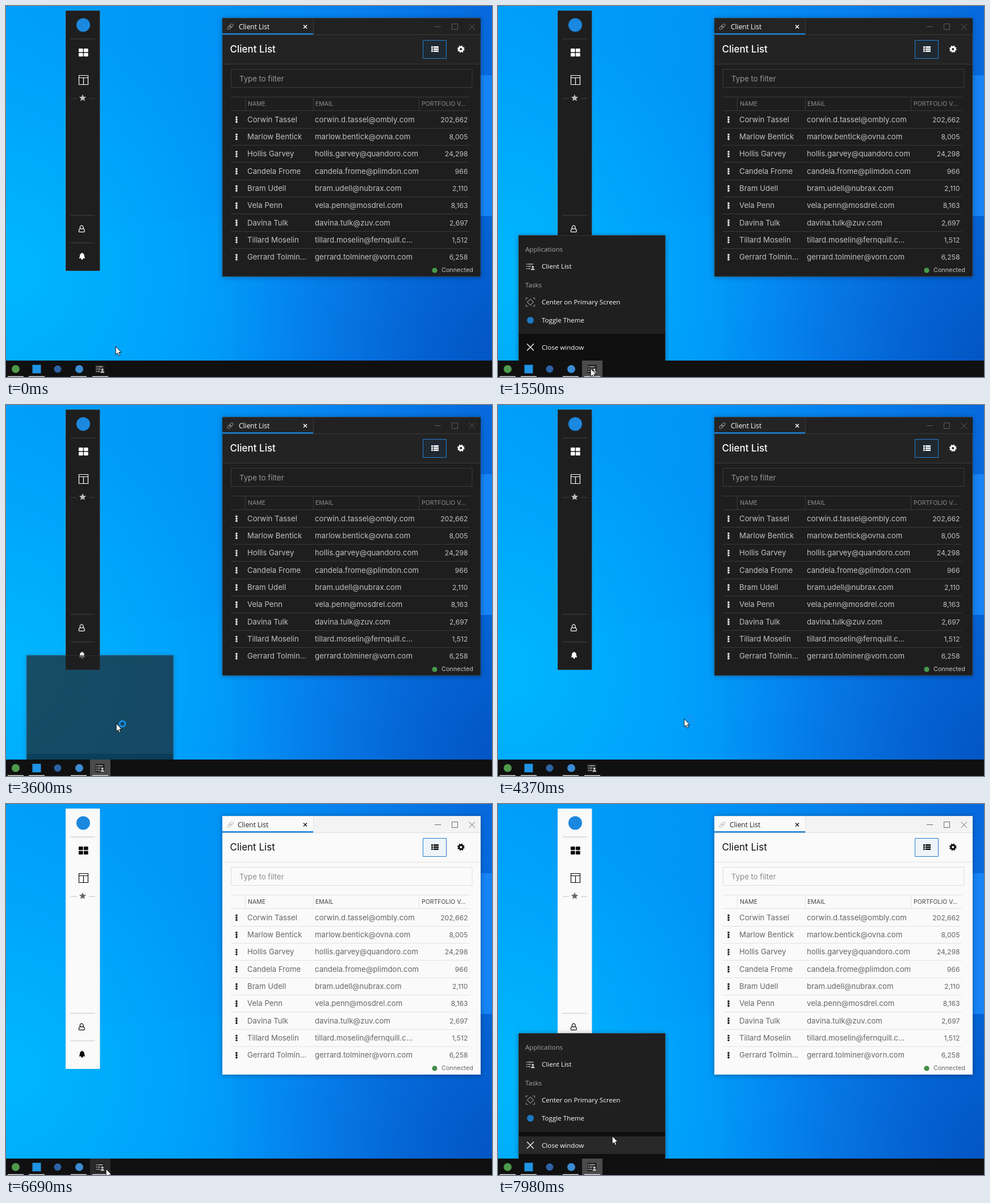
An HTML page for the animation above (8000 ms loop, 856 by 654 pixels).

```html
<!DOCTYPE html>
<html lang="en">
<head>
<meta charset="utf-8">
<title>Client List</title>
<style>
html, body { margin: 0; width: 100%; height: 100%; overflow: hidden; background: #0098f8; }
svg { display: block; }

/* the content changes first, controls fade in, the title bar follows */
#scene { animation: theme 8s step-end infinite, controls 8s step-end infinite, chrome 8s step-end infinite; }

@keyframes theme {
  0% {
    --dock: #1e1e1e; --dock-line: #383838; --star: #bdbdbd;
    --page: #1e1e1e; --head: #232323; --frame: #343434; --line: #3a3a3a; --toggle: #202931;
    --ink: #fff; --label: #8e8e8e; --hint: #999; --cell: #c2c2c2; --weight: 500;
  }
  59.75%, 100% {
    --dock: #fafafa; --dock-line: #d4d4d4; --star: #666;
    --page: #fafafa; --head: #fafafa; --frame: #f6f6f6; --line: #e2e2e2; --toggle: #eef4f9;
    --ink: #111; --label: #444; --hint: #8c8c8c; --cell: #666; --weight: 400;
  }
}
@keyframes controls {
  0% { --dock-icon: #fff; --field: #3c3c3c; --dot: #479a4b; }
  59.75% { --dock-icon: #ececec; --field: #fafafa; --dot: #4a6b4c; }
  60.625% { --dock-icon: #999; --field: #eee; --dot: #49774b; }
  61.5%, 100% { --dock-icon: #0a0a0a; --field: #dedede; --dot: #458d4a; }
}
@keyframes chrome {
  0% {
    --bar: #212121; --tab: #242424; --bar-line: #3a3a3a;
    --ctl: #5c5c5c; --link: #858585; --tab-ink: #fff; --shift: 0px;
  }
  61.5%, 100% {
    --bar: #f3f3f3; --tab: #fafafa; --bar-line: #dedede;
    --ctl: #6a6a6a; --link: #c4c4c4; --tab-ink: #222; --shift: -2px;
  }
}

/* shared text styles */
.ui { font: 11.6px "Open Sans", sans-serif; fill: #fff; }
.app { font: 13.2px Inter, sans-serif; }
.dim { fill: #a6a6a6; }

/* dock */
.shadow { filter: drop-shadow(0 1px 4px rgba(0, 0, 0, .35)); }
.dock { fill: var(--dock); stroke: var(--frame); }
.dock-line { stroke: var(--dock-line); stroke-width: 1.4; }
.dock-icon { fill: var(--dock-icon); }
.dock-outline { fill: none; stroke: var(--dock-icon); stroke-width: 1.2; }
.star { fill: var(--star); }

/* client window */
.page { fill: var(--page); }
.head { fill: var(--head); }
.bar { fill: var(--bar); }
.tab { fill: var(--tab); }
.frame { fill: none; stroke: var(--frame); }
.line { fill: none; stroke: var(--line); }
.bar-line { fill: none; stroke: var(--bar-line); }
.field { fill: none; stroke: var(--field); }
.toggle { fill: var(--toggle); stroke: #2480cf; }
.ctl { fill: none; stroke: var(--ctl); }
.link { fill: none; stroke: var(--link); stroke-width: 1.2; }
.ink { fill: var(--ink); }
.ink-line { fill: none; stroke: var(--ink); }
.tab-close { stroke: var(--tab-ink); stroke-width: 1.5; }
.tab-title { font: 500 12px "Open Sans", sans-serif; fill: var(--tab-ink); transform: translateX(var(--shift)); }
.title { font-size: 17px; font-weight: var(--weight); fill: var(--ink); }
.label { font-size: 10.5px; fill: var(--label); }
.hint { fill: var(--hint); }
.cell { fill: var(--cell); }
.num { font-size: 12.2px; text-anchor: end; }
.status { font-size: 10.8px; fill: var(--cell); }
.dot { fill: var(--dot); }

/* task bar and jump list */
.button { animation: button 8s step-end infinite; }
@keyframes button {
  0% { fill: transparent; }
  7.625% { fill: #2a2a2a; }
  15.25% { fill: #4b4b4b; }
  45.875% { fill: transparent; }
  81.875% { fill: #2a2a2a; }
  91.125%, 100% { fill: #4b4b4b; }
}
.menu { animation: menu 8s step-end infinite; }
@keyframes menu {
  0%, 45.875% { opacity: 0; transform: translateY(40px); }
  16.875%, 92% { opacity: .5; transform: translateY(37px); }
  17.75%, 92.875% { opacity: .9; transform: translateY(14px); }
  18.625%, 93.75% { opacity: 1; transform: translateY(4px); }
  19.375%, 94.625%, 100% { opacity: 1; transform: none; }
  44.125% { opacity: .9; transform: translateY(16px); }
  45% { opacity: .69; transform: translateY(37px); }
}
.items { animation: items 8s step-end infinite; }
@keyframes items {
  0%, 44.125% { opacity: 0; }
  17.75%, 92.875%, 100% { opacity: 1; }
}
.pick-theme { fill: #353535; animation: pick-theme 8s step-end infinite; }
@keyframes pick-theme {
  0%, 44%, 100% { opacity: 0; }
  31.375% { opacity: 1; }
}
.pick-close { fill: #292929; animation: pick-close 8s step-end infinite; }
@keyframes pick-close {
  0%, 29.625% { opacity: 0; }
  27%, 98%, 100% { opacity: 1; }
}

/* pointer: holds between moves, advances in small even steps */
.pointer { animation: pointer 8s step-end infinite; }
@keyframes pointer {
  0% { transform: translate(193px, 600px); }
  2.375% { transform: translate(193px, 600px); animation-timing-function: steps(8); }
  9.375% { transform: translate(165px, 634px); }
  12.75% { transform: translate(163px, 639px); }
  23.5% { transform: translate(163px, 639px); animation-timing-function: steps(5); }
  27.875% { transform: translate(176px, 600px); animation-timing-function: steps(5); }
  32.25% { transform: translate(193px, 568px); animation-timing-function: steps(2); }
  34% { transform: translate(192px, 563px); animation-timing-function: steps(4); }
  37.5% { transform: translate(194px, 561px); }
  46% { transform: translate(194px, 561px); animation-timing-function: steps(4); }
  49.375% { transform: translate(273px, 547px); animation-timing-function: steps(9); }
  57.25% { transform: translate(355px, 556px); }
  72.25% { transform: translate(355px, 556px); animation-timing-function: steps(4); }
  75.75% { transform: translate(305px, 580px); animation-timing-function: steps(4); }
  79.25% { transform: translate(215px, 622px); animation-timing-function: steps(4); }
  82.75% { transform: translate(176px, 641px); }
  83.625% { transform: translate(176px, 643px); }
  95.5% { transform: translate(176px, 643px); animation-timing-function: steps(5); }
  99.75%, 100% { transform: translate(201px, 585px); }
}
.busy { animation: busy 8s step-end infinite; }
@keyframes busy {
  0%, 57.25%, 100% { opacity: 0; }
  40.875% { opacity: 1; }
}
</style>
</head>
<body>
<svg id="scene" width="856" height="654" viewBox="0 0 856 654">
  <defs>
    <linearGradient id="sky">
      <stop offset="0" stop-color="#009ff8"/>
      <stop offset=".4" stop-color="#0096f7"/>
      <stop offset=".72" stop-color="#0780ee"/>
      <stop offset="1" stop-color="#0669dc"/>
    </linearGradient>
    <radialGradient id="glow" gradientUnits="userSpaceOnUse" cx="0" cy="470" r="460">
      <stop offset="0" stop-color="#00b8ff"/>
      <stop offset="1" stop-color="#00b0ff" stop-opacity="0"/>
    </radialGradient>
    <radialGradient id="dusk" gradientUnits="userSpaceOnUse" cx="880" cy="620" r="440">
      <stop offset="0" stop-color="#0354c2"/>
      <stop offset="1" stop-color="#0360d0" stop-opacity="0"/>
    </radialGradient>
    <g id="clients">
      <path d="M-7-5h2M-7-1h2M-7 3h2M-4-5h9M-4-1h5M-4 3h4" stroke="#b8b8b8" stroke-width="1.6"/>
      <circle cx="4.3" cy="0" r="1.9" fill="#d0d0d0"/>
      <path d="M1 5.4q0-3 3.3-3t3.3 3z" fill="#d0d0d0"/>
    </g>
  </defs>

  <g id="wallpaper">
    <path fill="url(#sky)" d="M0 0h856v654H0z"/>
    <path fill="url(#glow)" d="M0 0h856v654H0z"/>
    <path fill="url(#dusk)" d="M0 0h856v654H0z"/>
    <path fill="#00b4ff" opacity=".1" d="M0 411 400 368V654H0z"/>
    <path fill="#1684f4" d="M836 122h248v248H836z"/>
  </g>

  <g id="dock">
    <path class="dock" d="M105.5 8.5h59.5v458h-59.5z"/>
    <circle cx="136" cy="33.5" r="12" fill="#1b88e0"/>
    <path class="dock-line" d="M113.5 58h43M113.5 369h43M113.5 417.5h43M114 163h11M146 163h11"/>
    <g class="dock-icon">
      <rect x="128" y="75" width="7.7" height="6.2" rx="1"/>
      <rect x="137" y="75" width="7.7" height="6.2" rx="1"/>
      <rect x="128" y="82.700" width="7.7" height="6.2" rx="1"/>
      <rect x="137" y="82.700" width="7.7" height="6.2" rx="1"/>
    </g>
    <path class="dock-outline" d="M128.5 122.5h16v16h-16zM128 126.500h17M136.500 127v12"/>
    <path class="star" transform="translate(135 162)" d="M0-6.2 1.8-2 6.2-1.7 2.8 1.2 3.9 5.6 0 3.2-3.9 5.6-2.8 1.2-6.2-1.7-1.8-2Z"/>
    <g class="dock-outline" transform="translate(133.3 393)">
      <circle cy="-2.8" r="3"/>
      <path d="M-2.3-.6C-5 .2-5 2.500-5 4.2Q-5 5.400-3.800 5.400H3.800Q5 5.400 5 4.2C5 2.500 5 .2 2.300-.6"/>
    </g>
    <g class="dock-icon" transform="translate(134 441)">
      <path d="M-5.6 3.8Q-3.9 2-3.9-1a3.9 3.9 0 0 1 7.8 0Q3.9 2 5.6 3.8z"/>
      <circle cy="-5" r="1"/><circle cy="4.6" r="1.6"/>
    </g>
  </g>

  <g id="window">
    <path class="page shadow" d="M381 21h455v456H381z"/>
    <path class="head" d="M381 50h455v53H381z"/>
    <path class="frame" d="M381.5 21.5h454v455h-454z"/>
    <path class="bar" d="M381 21h455v30H381z"/>
    <path class="tab" d="M381 21h160.5v29H381z"/>
    <path class="line" d="M382 102.5h453"/>
    <path class="bar-line" d="M541.5 21v29M381 50.5h455M381 21.5h455"/>
    <path fill="#1a80d6" d="M381 48h160v2.6H381z"/>
    <g class="link" transform="translate(395 36.5) rotate(-45)">
      <rect x="-6.2" y="-2.1" width="7.2" height="4.2" rx="2.1"/>
      <rect x="-1" y="-2.1" width="7.2" height="4.2" rx="2.1"/>
    </g>
    <text class="tab-title" x="410" y="41">Client List</text>
    <path class="tab-close" d="M524 33.5l6 6M530 33.5l-6 6"/>
    <path class="ctl" d="M755 36.5h11M785.5 31.5h10v10h-10zM815.5 31.5l10.5 10.5M826 31.5l-10.5 10.5"/>

    <g class="app">
      <text class="title" x="394.5" y="81.5">Client List</text>
      <path class="toggle" d="M734.5 60.5h41v32h-41z"/>
      <path class="ink" d="M749 71h3v2.7h-3zM753 71h9v2.7h-9zM749 74.7h3v2.7h-3zM753 74.7h9v2.7h-9zM749 78.4h3v2.7h-3zM753 78.4h9v2.7h-9z"/>
      <g class="ink-line" transform="translate(801.3 76)">
        <circle r="3.5" stroke-width="2.8"/>
        <circle r="5.2" stroke-width="2.2" stroke-dasharray="2.3 1.784"/>
      </g>
      <path class="field" d="M396.5 111.5h424.5v32h-424.5z"/>
      <text class="hint" x="411" y="132.7">Type to filter</text>
      <path class="line" d="M396 160.5h421M396 184.5h421M421.5 161v23M541.5 161v23M727.5 161v23"/>
      <text class="label" x="426" y="176">NAME</text>
      <text class="label" x="545" y="176">EMAIL</text>
      <text class="label" x="732" y="176">PORTFOLIO V...</text>
      <g id="rows"></g>
      <circle class="dot" cx="755" cy="466" r="4.6"/>
      <text class="status" x="767" y="469.3">Connected</text>
    </g>
  </g>

  <g class="menu">
    <path class="shadow" fill="#1f1f1f" stroke="#383838" d="M36.5 404.5h258v221h-258z"/>
    <path fill="#0f0f0f" d="M37 578h257v47H37z"/>
    <g class="items ui">
      <path class="pick-theme" d="M37 538.5h257V570H37z"/>
      <path class="pick-close" d="M37 586h257v31H37z"/>
      <text class="dim" x="48" y="433">Applications</text>
      <use href="#clients" x="57" y="460"/>
      <text x="77" y="463">Client List</text>
      <text class="dim" x="48" y="496">Tasks</text>
      <g transform="translate(57 522)" fill="none" stroke="#8a8a8a" stroke-width="1.2">
        <path d="M0-5.5 5.5 0 0 5.5-5.5 0z"/>
        <path d="M-7.5-4v-3.5H-4M4-7.5h3.5V-4M7.5 4v3.5H4M-4 7.5h-3.5V4"/>
      </g>
      <text x="77" y="526">Center on Primary Screen</text>
      <circle cx="57" cy="554" r="6" fill="#1f78c4"/>
      <text x="77" y="558">Toggle Theme</text>
      <path stroke="#fff" stroke-width="1.3" d="M51 595.5l12 12M63 595.5l-12 12"/>
      <text x="77" y="606">Close window</text>
    </g>
  </g>

  <g id="taskbar">
    <path fill="#101010" d="M0 625h856v29H0z"/>
    <path class="button" d="M148 625h36v29h-36z"/>
    <circle cx="17" cy="640" r="7" fill="#4f9a4c"/>
    <path fill="#1f94e4" d="M46.5 632.5h15v15h-15z"/>
    <circle cx="91" cy="640" r="6.5" fill="#2c62a4"/>
    <circle cx="129" cy="640" r="7" fill="#3b8cd2"/>
    <path fill="#222" d="M157.5 632.5h16v15h-16z"/>
    <use href="#clients" x="165.5" y="641"/>
    <path fill="#d8d8d8" d="M3 652.5h28v1.5H3zM40 652.5h28v1.5H40zM114 652.5h28v1.5h-28zM152 652.5h28v1.5h-28z"/>
  </g>

  <g class="pointer">
    <circle class="busy" cx="11" cy="1" r="5" fill="none" stroke="#1a94ee" stroke-width="2.6"/>
    <path fill="#fff" stroke="#000" stroke-width=".9" d="M.2.3v14.2l3.2-3 2.2 5 2.3-1-2.2-4.8h4.3z"/>
  </g>
</svg>

<script>
const clients = [
  ["Corwin Tassel", "corwin.d.tassel@ombly.com", "202,662"],
  ["Marlow Bentick", "marlow.bentick@ovna.com", "8,005"],
  ["Hollis Garvey", "hollis.garvey@quandoro.com", "24,298"],
  ["Candela Frome", "candela.frome@plimdon.com", "966"],
  ["Bram Udell", "bram.udell@nubrax.com", "2,110"],
  ["Vela Penn", "vela.penn@mosdrel.com", "8,163"],
  ["Davina Tulk", "davina.tulk@zuv.com", "2,697"],
  ["Tillard Moselin", "tillard.moselin@fernquill.c...", "1,512"],
  ["Gerrard Tolmin...", "gerrard.tolminer@vorn.com", "6,258"]
];
const pitch = 30.3;

function row([name, email, value], i) {
  const y = 200.3 + i * pitch;
  const base = y + 4.5;
  const dots = [-4, 0, 4].map(d =>
    `<rect class="ink" x="404.4" y="${y + d - 1.5}" width="3.2" height="3.2" rx="1"/>`).join("");
  const rule = i < clients.length - 1
    ? `<path class="line" d="M396 ${Math.round(y + 14.4) + .5}h421"/>` : "";
  return `${dots}${rule}
    <text class="cell" x="425" y="${base}">${name}</text>
    <text class="cell" x="544" y="${base}">${email}</text>
    <text class="cell num" x="813.5" y="${base}">${value}</text>`;
}

document.getElementById("rows").innerHTML = clients.map(row).join("");
</script>
</body>
</html>
```
